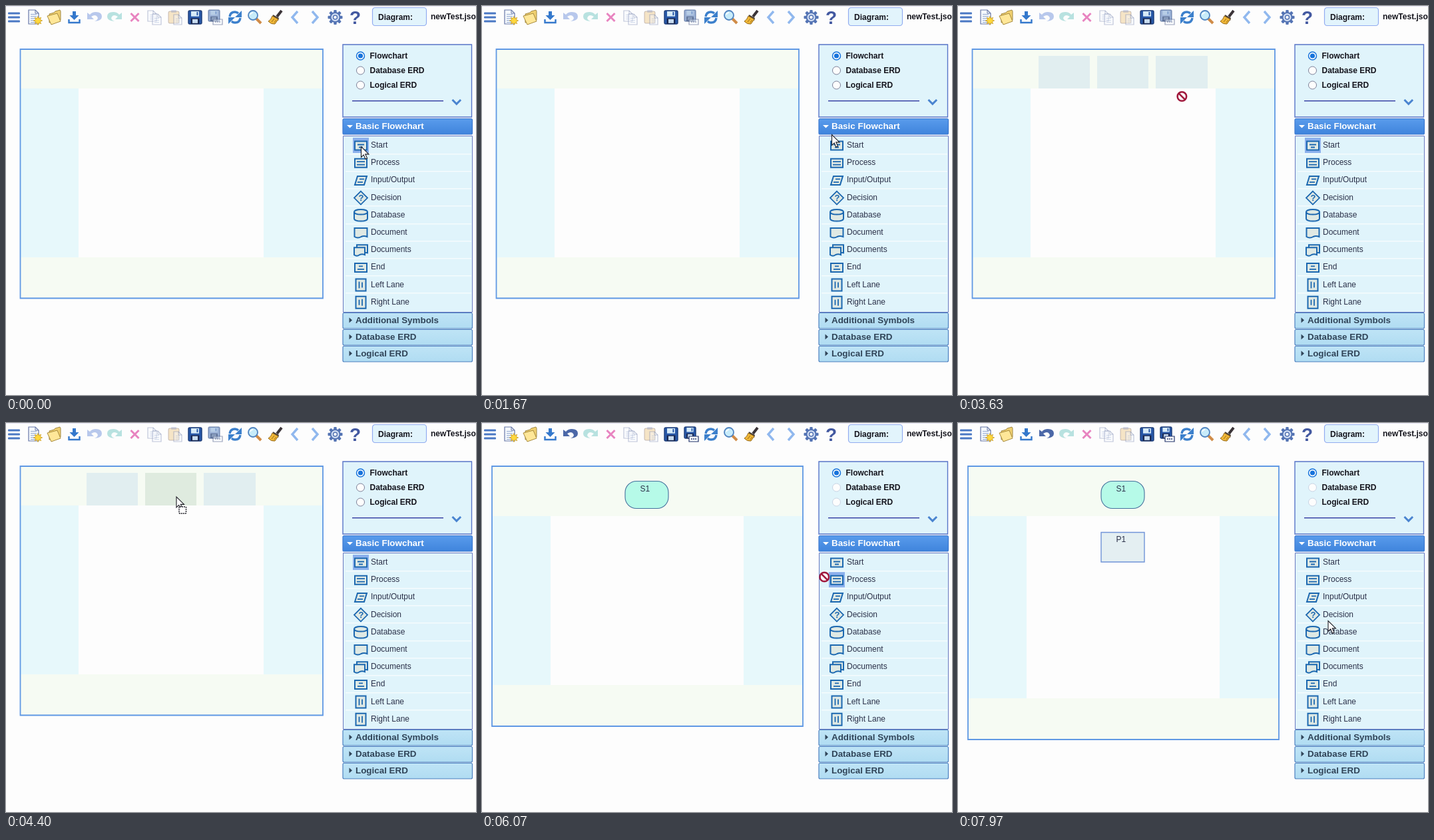
An HTML page with a canvas for the animation above (8 s loop, 706 by 585 pixels).

```html
<!DOCTYPE html>
<html lang="en">
<head>
<meta charset="utf-8">
<title>Flowchart editor</title>
<style>
html, body { margin: 0; width: 706px; height: 585px; overflow: hidden; background: #fdfdfd; }
canvas { display: block; }
</style>
</head>
<body>
<canvas id="stage" width="706" height="585"></canvas>
<script>
const ctx = document.getElementById('stage').getContext('2d');
const LOOP = 8000;
const FONT = '"Liberation Sans", Arial, sans-serif';
const PAPER = '#fdfdfd', STRIP = '#f6fbf3', LANE = '#e7f8fb', PANEL = '#e0f4fb';
const CELL = '#e1eef0', CELL_OVER = '#dfebdf';
const BLUE = '#1c68b0', ICON_FILL = '#dfe9e4', FRAME = '#5f98e4', INK = '#2a3048';

// Pointer stops: time, x, y
const PATH = [
  [0, 533, 211], [700, 532, 209], [1670, 525, 193], [2250, 531, 207],
  [2750, 529, 210], [2970, 519, 215], [3900, 290, 116], [4400, 255.5, 110.5],
  [4560, 253, 110], [5100, 577.5, 262], [5650, 533, 234], [5950, 531, 235],
  [6750, 260, 178], [7070, 249, 176.5], [7170, 249, 177], [7750, 552, 290],
  [7970, 555.5, 297], [8000, 555.5, 297]
];
const DRAG_START = [2850, 4560], DRAG_PROCESS = [6000, 7100];
const RELEASE = 7040, PLACED = 7110;

function fillRect(x, y, w, h, color) {
  ctx.fillStyle = color;
  ctx.fillRect(x, y, w, h);
}

function shape(path, fill, stroke, width = 1) {
  const p = typeof path === 'string' ? new Path2D(path) : path;
  if (fill) { ctx.fillStyle = fill; ctx.fill(p); }
  if (stroke) { ctx.strokeStyle = stroke; ctx.lineWidth = width; ctx.stroke(p); }
}

function box(x, y, w, h, r, fill, stroke, width = 1) {
  const p = new Path2D();
  p.roundRect(x, y, w, h, r);
  shape(p, fill, stroke, width);
}

function circle(x, y, r, fill, stroke, width) {
  const p = new Path2D();
  p.arc(x, y, r, 0, Math.PI * 2);
  shape(p, fill, stroke, width);
}

function shade(y, h, top, bottom) {
  const g = ctx.createLinearGradient(0, y, 0, y + h);
  g.addColorStop(0, top);
  g.addColorStop(1, bottom);
  return g;
}

function label(text, x, y, color = INK, size = 12, weight = 'normal') {
  ctx.font = `${weight} ${size}px ${FONT}`;
  ctx.fillStyle = color;
  ctx.fillText(text, x, y);
}

function at(x, y, draw, alpha = 1) {
  ctx.save();
  ctx.translate(x, y);
  ctx.globalAlpha = alpha;
  draw();
  ctx.restore();
}

// Toolbar icons, drawn around their centres
function page(x, y, w, h) {
  shape(`M${x} ${y}h${w - 5}l5 5v${h - 5}h${-w}z`, '#f4f8fc', '#6878a8', 1.2);
  shape(`M${x + w - 5} ${y}v5h5`, null, '#6878a8');
  for (let i = 5; i < h - 2; i += 3) shape(`M${x + 3} ${y + i + 1.5}h${w - 6}`, null, '#94a8d0');
}

function newFile() {
  page(-9, -11, 15, 21);
  const star = new Path2D();
  for (let i = 0; i < 16; i++) {
    const r = i % 2 ? 3.6 : 6.6, a = i * Math.PI / 8;
    star.lineTo(5 + r * Math.cos(a), 5 + r * Math.sin(a));
  }
  star.closePath();
  shape(star, '#ffd83c', '#c89a20', 0.8);
}

function folder() {
  shape('M-8 8v-13l7-2 2-2 7-2 1 2v13z', '#f0d070', '#a08844');
  shape('M-11-2l15-4 5 12-14 5z', '#ffe798', '#a78a3c');
}

function download() {
  shape('M-2.5-9h5v6h4.5l-7 7-7-7h4.5z', '#3478cc');
  shape('M-8 3v5h16v-5', null, '#3478cc', 2.4);
}

function bendArrow(color) {
  shape('M-11-7v10h10l-4-4q6-4 9 0 3 4-4 7 11-1 11-7 0-7-9-7-6 0-9 4z', color);
}

function cross() {
  shape('M-6-6l12 12M6-6l-12 12', null, '#e884c0', 3);
}

function copy() {
  page(-10, -10, 13, 16);
  page(-3, -5, 13, 16);
}

function paste() {
  box(-10, -9, 16, 18, 2, '#e8bd74', '#7c6a70');
  box(-6, -11, 8, 4, 1, '#9aa4c8');
  page(-2, -4, 12, 15);
}

function floppy(x, y, s) {
  box(x, y, s, s, 2, '#2858a8', '#1c3c78', 1.4);
  fillRect(x + s * .2, y + 1, s * .6, s * .38, '#d7ebf8');
  fillRect(x + s * .62, y + 2, s * .1, s * .25, '#2858a8');
  fillRect(x + s * .18, y + s * .57, s * .64, s * .43, '#1a2850');
  fillRect(x + s * .3, y + s * .64, s * .4, s * .3, '#c8dcf0');
}

function saveAs() {
  floppy(-10, -11, 17);
  box(-3, 3, 14, 8, 0, '#f4f8fc', '#26366c', 1.2);
  shape('M0 7h2m1 0h2m1 0h2', null, '#26366c', 1.5);
}

function refresh() {
  for (let i = 0; i < 2; i++) {
    shape('M-8-1q1-7 8-7 3 0 5 2', null, '#3c80cc', 3.4);
    shape('M10-10v10h-10z', '#3c80cc');
    ctx.rotate(Math.PI);
  }
}

function magnifier() {
  shape('M2 2l7 7', null, '#d08c48', 4);
  circle(-3, -3, 7, '#c8ecfa', '#5084c0', 1.8);
  shape('M-7-4q1-3 4-3', null, '#fff', 1.5);
}

function brush() {
  shape('M9-10l-7 9', null, '#3b3438', 4);
  shape('M-4-4l9 5-1 4-9-5z', '#4a4038');
  shape('M-5-2l9 5-5 7q-6 1-10-4 4-2 6-8z', '#f0b838', '#94681c');
  shape('M-6 7l4-5m0 6l3-4', null, '#9c6c18');
}

function chevron(dir) {
  shape(`M${4 * dir}-9l${-8 * dir} 9 ${8 * dir} 9`, null, '#90b8ee', 3.4);
}

function gear() {
  for (let i = 0; i < 8; i++) {
    box(-2.2, -11, 4.4, 5, 1, '#5474b4');
    ctx.rotate(Math.PI / 4);
  }
  circle(0, 0, 7, '#d4e0f4', '#5474b4', 2);
  circle(0, 0, 3, PAPER, '#5474b4', 1.5);
}

function hamburger() {
  for (const y of [-6, 0, 6]) box(-9, y - 1.5, 18, 3, 1, '#4a78c4');
}

function toolbar(edited) {
  fillRect(0, 0, 706, 1, '#e8e6f6');
  const icon = (x, draw, alpha) => at(x, 17, draw, alpha);
  icon(12, hamburger);
  icon(43, newFile);
  icon(73, folder);
  icon(102.5, download);
  icon(133, () => bendArrow(edited ? '#4c68a8' : '#b8c8ec'));
  icon(163, () => { ctx.scale(-1, 1); bendArrow('#b8e2e0'); });
  icon(193.5, cross);
  icon(223, copy, .4);
  icon(254, paste, .4);
  icon(284, () => floppy(-10, -10, 20));
  icon(314, saveAs, edited ? 1 : .45);
  icon(344, refresh);
  icon(374, magnifier);
  icon(405, brush);
  icon(434, () => chevron(1));
  icon(464, () => chevron(-1));
  icon(494.5, gear);
  label('?', 516, 27, '#4258a0', 28, 'bold');
  box(550.5, 2.5, 81, 27, 4, '#e2f4fc', '#92acf0', 1.2);
  label('Diagram:', 559, 21, '#14141c', 12, 'bold');
  label('newTest.json', 638, 20, '#14141c', 12, 'bold');
}

function options(edited) {
  box(506, 58, 193.5, 109, 0, PANEL, '#5874c8', 1.4);
  ['Flowchart', 'Database ERD', 'Logical ERD'].forEach((name, i) => {
    const y = 75 + i * 22, on = i === 0;
    circle(532.5, y, 6, PAPER, on ? '#1874dc' : edited ? '#c8d4e4' : '#7c8098', on ? 1.5 : 1);
    if (on) circle(532.5, y, 3.6, '#1874dc');
    label(name, 546.5, y + 4, '#14141c', 12, 'bold');
  });
  fillRect(520, 142, 137, 1.4, '#3038a0');
  shape('M670.5 141l6.3 6.3 6.3-6.3', null, '#4a84d0', 3);
}

function header(y, name, open) {
  const fill = open ? shade(y, 24, '#5a9cec', '#3f84dc') : shade(y, 24, '#bfe4f6', '#b0dcf2');
  box(506, y + .5, 194.5, 23.5, 2, fill, open ? '#3c78d0' : '#4c80c0', 1.2);
  const ink = open ? '#fff' : '#304458';
  shape(open ? `M512 ${y + 10}h9l-4.5 4.5z` : `M515.5 ${y + 7.5}v8l4.5-4z`, ink);
  label(name, 525, y + 16, ink, 13.4, 'bold');
}

function tile(lines, slant = 0) {
  shape(`M${-9 + slant}-6.5h${18 - slant}l${-slant} 13h${-18 + slant}z`, ICON_FILL, BLUE, 2);
  shape(lines, null, BLUE, 1.8);
}

function lane(lines) {
  shape('M-7.5-9h15v18h-15z', ICON_FILL, BLUE, 2);
  shape(lines, null, BLUE, 1.8);
}

const DOC = 'M-9.5-7h19v13q-5-2-9 0-5 3-10 0z';
const ITEMS = [
  ['Start', () => tile('M-5-1.5h10M-3 2.5h6')],
  ['Process', () => tile('M-6-2h12M-6 2.5h12')],
  ['Input/Output', () => tile('M-2-2h7M-5 2.5h8', 4)],
  ['Decision', () => {
    shape('M0-10l10 10-10 10-10-10z', ICON_FILL, BLUE, 1.8);
    label('?', -3.5, 4.5, BLUE, 13, 'bold');
  }],
  ['Database', () => {
    shape('M-10-5v10c0 5 20 5 20 0v-10', ICON_FILL, BLUE, 2);
    shape('M-10-5c0-5 20-5 20 0s-20 5-20 0z', ICON_FILL, BLUE, 2);
  }],
  ['Document', () => shape(DOC, ICON_FILL, BLUE, 2)],
  ['Documents', () => {
    shape('M-6-8h16v12q-4-1-8 0l-8 1z', ICON_FILL, BLUE, 2);
    shape('M-10-4h16v11q-4-2-8 0-4 3-8 0z', ICON_FILL, BLUE, 2);
  }],
  ['End', () => tile('M-3-2h6M-5 2.5h10')],
  ['Left Lane', () => lane('M-2.5-5v10M2-4v8')],
  ['Right Lane', () => lane('M-2.5-4v8M2-5v10')]
];

function palette(active) {
  header(169, 'Basic Flowchart', true);
  box(506.5, 195.5, 194, 265, 0, PANEL, '#6878c0');
  ITEMS.forEach(([name, icon], i) => {
    const y = 209.5 + i * 26.2;
    if (i) fillRect(510, Math.round(y - 14), 189, 1.5, '#f6fcfd');
    if (i === active) fillRect(521, y - 11.5, 24, 23, '#8cb0ec');
    at(533, y + .5, icon);
    label(name, 548, Math.round(y + 3.4));
  });
  header(461, 'Additional Symbols');
  header(486, 'Database ERD');
  header(511, 'Logical ERD');
}

function board(x, right, bottom, laneTop, laneBottom, inner, innerRight) {
  const w = right - x;
  box(x, 65, w, bottom - 65, 0, STRIP);
  fillRect(x, laneTop, w, laneBottom - laneTop, LANE);
  fillRect(inner, laneTop, innerRight - inner, laneBottom - laneTop, PAPER);
  box(x, 65, w, bottom - 65, 0, null, FRAME, 1.8);
}

const inside = (p, x, y, w, h) => p.x >= x && p.x < x + w && p.y >= y && p.y < y + h;

function cells(p, cols, rows, h) {
  let hit = false;
  for (const y of rows) {
    for (const [x, w] of cols) {
      const over = inside(p, x, y, w, h);
      hit = hit || over;
      fillRect(x, y, w, h, over ? CELL_OVER : CELL);
    }
  }
  return hit;
}

function pointer(p, mode) {
  at(p.x, p.y, () => {
    if (mode === 'blocked') {
      circle(0, 0, 6.8, '#fcf4f6', '#a0183c', 2.5);
      shape('M-4.5-4.5l9 9', null, '#a0183c', 2.5);
      return;
    }
    shape('M.5.5v16l3.7-3.6 2.8 6.3 2.6-1.2-2.8-6.1h5.2z', '#fff', '#1c1c24', 1.1);
    if (mode === 'drop') {
      box(4.5, 15.5, 10.5, 10, 1, '#fff');
      ctx.setLineDash([2, 1]);
      box(4.5, 15.5, 10.5, 10, 1, null, '#1c1c24', 1.4);
      ctx.setLineDash([]);
    }
  });
}

function pointerAt(t) {
  const i = Math.max(1, PATH.findIndex(k => k[0] > t));
  const [t0, x0, y0] = PATH[i - 1], [t1, x1, y1] = PATH[i];
  const u = (t - t0) / (t1 - t0), e = u * u * (3 - 2 * u);
  return { x: x0 + (x1 - x0) * e, y: y0 + (y1 - y0) * e };
}

const during = (t, [a, b]) => t >= a && t < b;

function draw(t) {
  const p = pointerAt(t);
  const started = t >= DRAG_START[1], processed = t >= PLACED;
  const dragStart = during(t, DRAG_START), dragProcess = during(t, DRAG_PROCESS);
  const hover = i => inside(p, 521, 198 + i * 26.2, 24, 23);
  let active = -1;
  if (dragStart || (!started && hover(0))) active = 0;
  else if (dragProcess || (started && !processed && hover(1))) active = 1;

  fillRect(0, 0, 706, 585, PAPER);
  toolbar(started);
  options(started);
  palette(active);

  const grow = processed ? 20 : 0;
  if (started) board(15, 482, 456 + grow, 140, 394 + grow, 103, 393);
  else board(21.5, 476, 439.5, 124, 378, 109, 387);

  let over = false;
  if (dragStart && p.x < 476) {
    over = cells(p, [[121, 77], [209, 77], [297, 78]], [75], 49);
  }
  if (dragProcess && p.x < 482) {
    over = cells(p, [[115, 77], [203, 90], [303, 78]], [151.5, 212, 272.5, 333], 50);
  }
  if (started) {
    box(215, 87.5, 65, 41, 17, '#b6fae8', '#44709c', 1.1);
    label('S1', 237.5, 103);
  }
  if (processed) {
    box(215, 164.5, 65, 44.5, 0, '#e4eff2', '#7094d8', 1.4);
    label('P1', 237.5, 179);
  }

  const dragging = dragStart || (dragProcess && t < RELEASE);
  pointer(p, !dragging ? 'arrow' : over ? 'drop' : 'blocked');
}

const begin = performance.now();
function tick() {
  draw((performance.now() - begin) % LOOP);
  requestAnimationFrame(tick);
}
tick();
</script>
</body>
</html>
```
